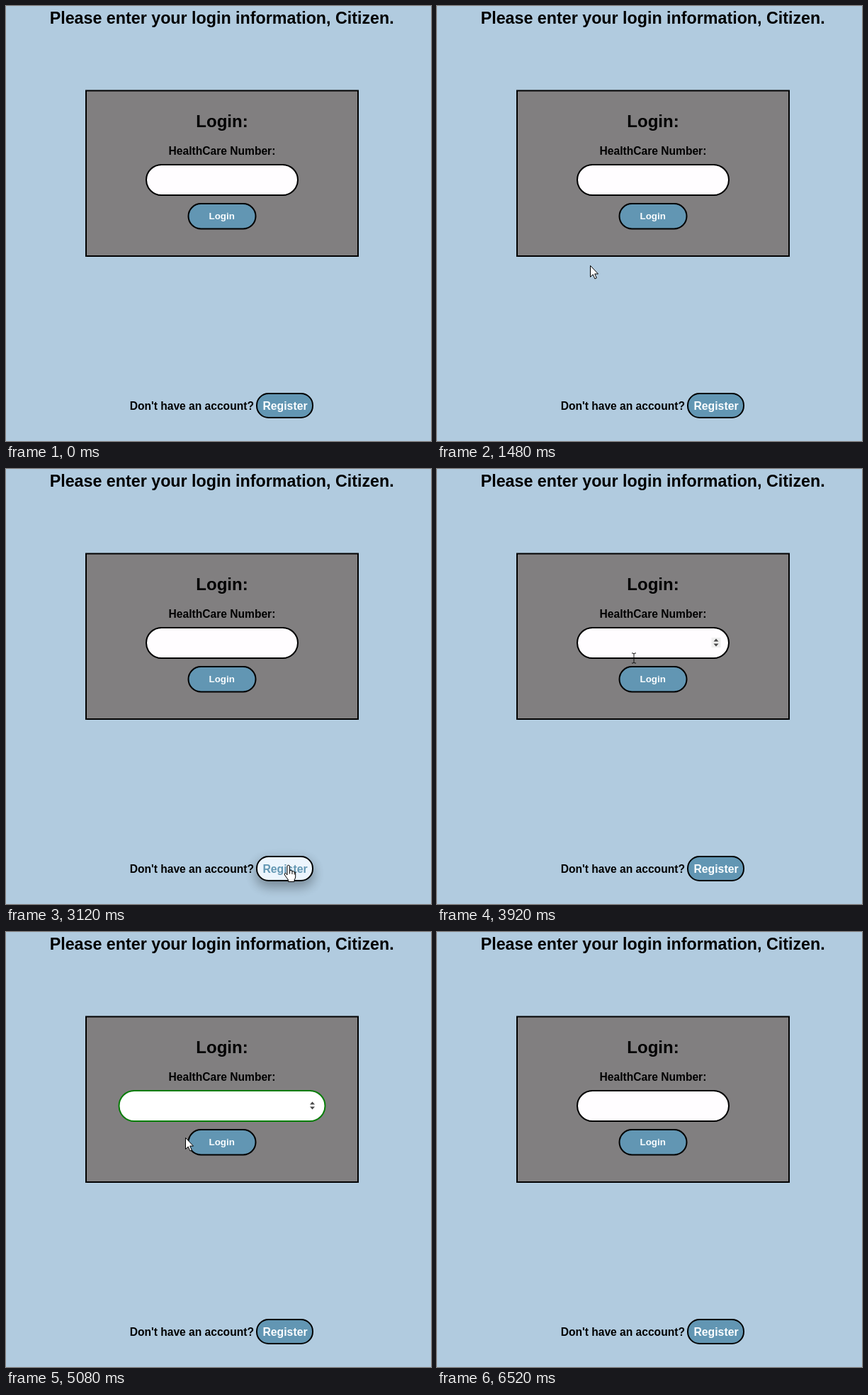
These frames come from a looping animation (600x614 px, 6600 ms). An HTML page:

```html
<!DOCTYPE html>
<html lang="en">
<head>
<meta charset="utf-8">
<title>Login form</title>
<style>
  html, body { margin: 0; width: 100%; height: 100%; overflow: hidden; background: #b1cbdf; }
  svg { display: block; width: 600px; height: 614px; }
  text { font: bold 15.6px "Liberation Sans", Arial, sans-serif; text-anchor: middle; }
  .box { stroke: #000; stroke-width: 2; }
  .near { filter: blur(8px); }
  .far { filter: blur(10px); }
</style>
</head>
<body>
<svg viewBox="0 0 600 614">
  <rect width="600" height="614" fill="#b1cbdf"/>
  <text x="304.7" y="25" style="font-size:23.28px">Please enter your login information, Citizen.</text>
  <rect class="box" x="113" y="119.5" width="384" height="233.5" fill="#817f80"/>
  <text x="305" y="171" style="font-size:24px">Login:</text>
  <text x="305" y="209.5">HealthCare Number:</text>

  <rect class="box" id="field" y="224" height="43" rx="21.5" fill="#fffdff"/>
  <g id="spinner">
    <rect id="spinnerBack" x="-6.5" y="-7" width="13" height="14" fill="#efefef"/>
    <path d="M-3.5 -1.5L0 -5.5L3.5 -1.5ZM-3.5 1.5L0 5.5L3.5 1.5Z" fill="#484848"/>
  </g>

  <g id="login">
    <g class="shadow">
      <rect class="near" x="256.5" y="286" width="97" height="37.5" rx="18.5" opacity=".2"/>
      <rect class="far" x="256.5" y="284" width="97" height="37.5" rx="18.5" opacity=".19"/>
    </g>
    <rect class="box face" x="257.5" y="279" width="95" height="35.5" rx="17.75"/>
    <text x="304.7" y="301.3" style="font-size:13.3px">Login</text>
  </g>

  <text x="262.3" y="569.7">Don't have an account?</text>
  <g id="register">
    <g class="shadow">
      <rect class="near" x="353" y="554" width="81" height="36" rx="17" opacity=".2"/>
      <rect class="far" x="353" y="552" width="81" height="36" rx="17" opacity=".19"/>
    </g>
    <rect class="box face" x="354" y="547" width="79" height="34" rx="16.5"/>
    <text x="394" y="569.7" style="font-size:15.8px">Register</text>
  </g>

  <g id="pointer">
    <path id="arrow" d="M.5 .5V16.5L4.2 13L6.9 19L9.3 17.9L6.7 12.1H11.5Z" fill="#fff" stroke="#000"/>
    <path id="hand" d="M-2 12V0Q-2 -1.8 -.3 -1.8T1.5 0V6Q4.5 4.5 5 7Q7.5 5.8 8.2 8Q10 7.3 9.7 10V15Q9.5 17 8 19V21.5H-.5V19L-5.6 12Q-6.5 9.2 -4.2 9.3ZM1.5 6V10.5M5 7V11M8.2 8V11.5" fill="#fff" stroke="#000" stroke-linejoin="round"/>
    <path id="beam" d="M-3 -7H-1L0 -6L1 -7H3M0 -6V6M-3 7H-1L0 6L1 7H3" fill="none" stroke="#111"/>
  </g>
</svg>
<script>
const LOOP = 6600;
const FADE = 400;
const BLUE = [98, 150, 179], PALE = [237, 246, 253], WHITE = [250, 253, 255];

// Pointer stops: time, x, y
const path = [
  [1040, 178, 616], [1480, 216, 366], [1840, 292, 300], [2220, 304, 298],
  [2480, 351, 452], [2780, 392, 553], [3120, 399, 561], [3440, 396, 560],
  [3920, 278, 267], [4160, 272, 247], [4760, 272, 247], [5080, 253, 290],
  [5400, 214, 398], [5760, 214, 402], [6320, 226, 616]
];
const hover = { login: [1800, 2326], register: [2740, 3500], field: [3890, 4960] };
const focus = [4280, 5620];

const $ = id => document.getElementById(id);
const clamp = v => Math.max(0, Math.min(1, v));
const smooth = v => (v = clamp(v), v * v * (3 - 2 * v));
const lerp = (a, b, k) => a + (b - a) * k;
const mix = (a, b, k) => `rgb(${a.map((v, i) => Math.round(lerp(v, b[i], k)))})`;
const within = (t, [from, to]) => t >= from && t < to;
const fade = (t, [from, to]) => smooth((t - from) / FADE) - smooth((t - to) / FADE);
const show = (id, on) => $(id).setAttribute('visibility', on ? 'visible' : 'hidden');

function drawButton(id, t) {
  const k = fade(t, hover[id]), group = $(id);
  group.querySelector('.shadow').setAttribute('opacity', k);
  group.querySelector('.face').setAttribute('fill', mix(BLUE, PALE, k));
  group.querySelector('text').setAttribute('fill', mix(WHITE, BLUE, k));
}

function drawField(t) {
  const focused = within(t, focus), over = within(t, hover.field);
  const width = lerp(214, 291, fade(t, focus));
  const field = $('field');
  field.setAttribute('x', 305 - width / 2);
  field.setAttribute('width', width);
  field.style.stroke = focused ? '#087d08' : '#000';
  field.setAttribute('fill', focused ? '#fff' : '#fffdff');
  $('spinner').setAttribute('transform', `translate(${305 + width / 2 - 18} 245)`);
  $('spinner').setAttribute('display', focused || over ? 'inline' : 'none');
  show('spinnerBack', over);
}

function drawPointer(t) {
  const next = path.findIndex(stop => stop[0] > t);
  const visible = next > 0;
  const over = name => within(t, hover[name]);
  const kind = over('login') || over('register') ? 'hand' : over('field') ? 'beam' : 'arrow';
  for (const id of ['arrow', 'hand', 'beam']) show(id, visible && id === kind);
  if (!visible) return;
  const [t0, x0, y0] = path[next - 1], [t1, x1, y1] = path[next];
  const k = smooth((t - t0) / (t1 - t0));
  $('pointer').setAttribute('transform', `translate(${lerp(x0, x1, k)} ${lerp(y0, y1, k)})`);
}

function draw(t) {
  drawButton('login', t);
  drawButton('register', t);
  drawField(t);
  drawPointer(t);
}

const start = performance.now();
function tick() {
  draw((performance.now() - start) % LOOP);
  requestAnimationFrame(tick);
}
tick();
</script>
</body>
</html>
```
